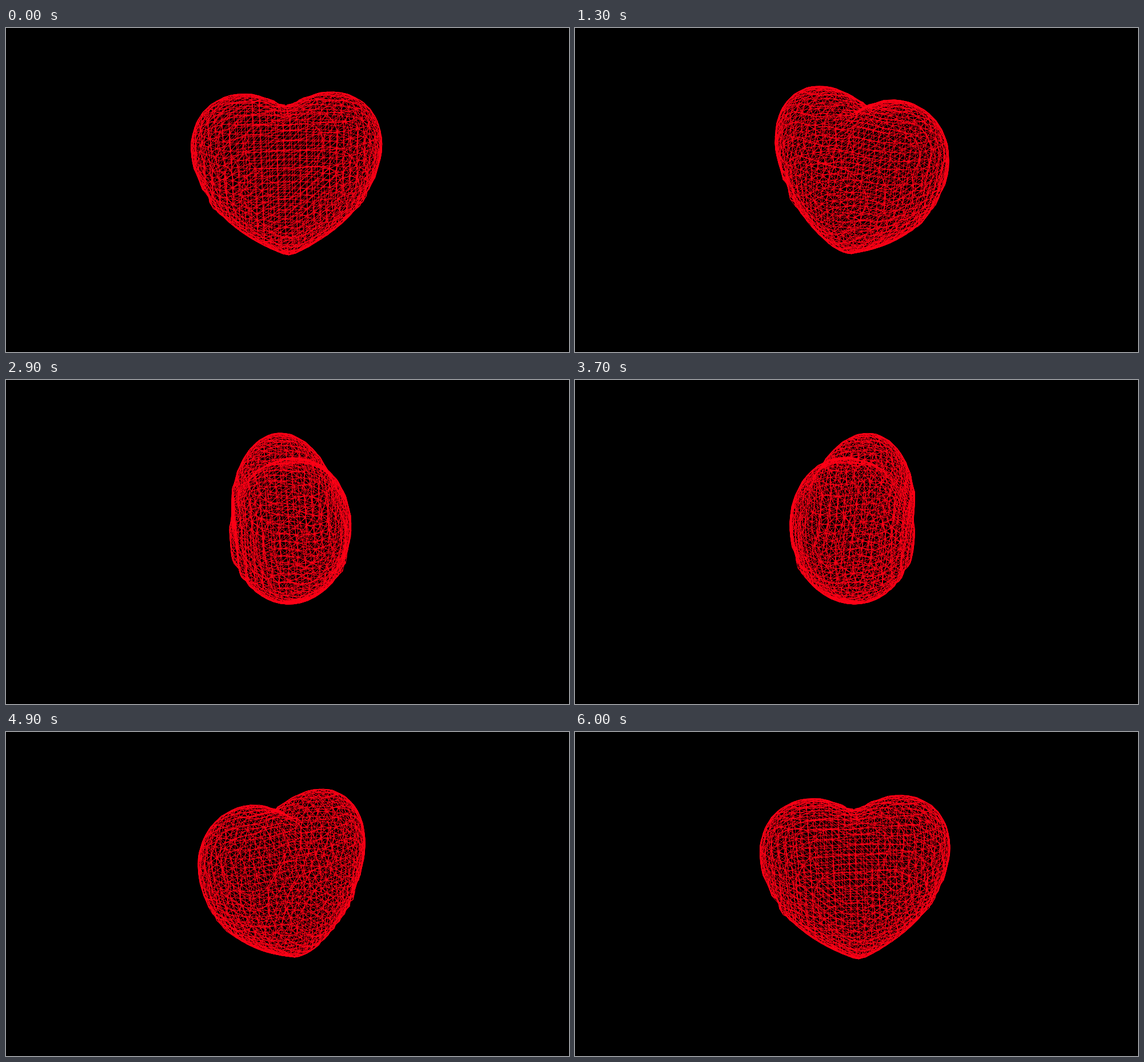
Write an HTML page with a canvas that moves like this. It is 985x568 px and loops after 6100 ms.

```html
<!DOCTYPE html>
<html>
<head>
<meta charset="utf-8">
<title>Rotating heart</title>
<style>
html, body { margin: 0; width: 100%; height: 100%; overflow: hidden; background: #000; }
canvas { display: block; }
</style>
</head>
<body>
<canvas id="stage" width="985" height="568"></canvas>
<script>
const W = 985, H = 568, LOOP = 6100, TICK = 100;
const ctx = document.getElementById('stage').getContext('2d');

const CELL = 0.08;               // grid spacing in heart units
const R = 17;                    // grid reaches from -R to R cells
const SIDE = 2 * R + 1;
const START_ANGLE = -4.7 * Math.PI / 180;
const TILT = Math.PI / 6;
const DISTANCE = 5;
const FOCAL = H / 2 / Math.tan(Math.PI / 8);

const heart = (x, y, z) =>
  (x * x + 2 * y * y + z * z - 1) ** 3 - (x * x + 0.1 * y * y) * z ** 3;

const nodeId = (i, j, k) => ((k + R) * SIDE + j + R) * SIDE + i + R;

function buildMesh() {
  const nodes = [];
  for (let k = -R; k <= R; k++)
    for (let j = -R; j <= R; j++)
      for (let i = -R; i <= R; i++) {
        const p = [i * CELL, j * CELL, k * CELL];
        nodes.push({ p, value: heart(...p) });
      }

  const vertices = [], vertexIds = new Map();
  const edges = [], known = new Set();
  const inside = id => nodes[id].value < 0;

  function crossing(a, b) {
    const lo = Math.min(a, b), hi = Math.max(a, b);
    const key = lo * nodes.length + hi;
    if (!vertexIds.has(key)) {
      const m = nodes[lo], n = nodes[hi];
      const f = m.value / (m.value - n.value);
      vertexIds.set(key, vertices.length);
      vertices.push(m.p.map((v, d) => v + f * (n.p[d] - v)));
    }
    return vertexIds.get(key);
  }

  function addEdge(a, b) {
    const key = Math.min(a, b) * 1e5 + Math.max(a, b);
    if (known.has(key)) return;
    known.add(key);
    edges.push([a, b]);
  }

  // Crossings are joined on each cell face; the joins close into polygons.
  function polygonize(corners) {
    const links = new Map();
    const join = (a, b) => {
      for (const [from, to] of [[a, b], [b, a]]) {
        if (!links.has(from)) links.set(from, []);
        links.get(from).push(to);
      }
    };
    for (let d = 0; d < 3; d++) {
      const u = 1 << (d + 1) % 3, v = 1 << (d + 2) % 3;
      for (const base of [0, 1 << d]) {
        const face = [base, base | u, base | u | v, base | v].map(c => corners[c]);
        const cuts = [];
        face.forEach((a, n) => {
          const b = face[(n + 1) % 4];
          if (inside(a) !== inside(b)) cuts.push(crossing(a, b));
        });
        if (cuts.length === 4 && inside(face[0])) cuts.unshift(cuts.pop());
        for (let n = 0; n < cuts.length; n += 2) join(cuts[n], cuts[n + 1]);
      }
    }
    const seen = new Set();
    for (const first of links.keys()) {
      if (seen.has(first)) continue;
      const loop = [];
      for (let at = first; at !== undefined; at = links.get(at).find(v => !seen.has(v))) {
        seen.add(at);
        loop.push(at);
      }
      loop.forEach((v, n) => {
        addEdge(v, loop[(n + 1) % loop.length]);
        if (n > 1 && n < loop.length - 1) addEdge(first, v);
      });
    }
  }

  for (let k = -R; k < R; k++)
    for (let j = -R; j < R; j++)
      for (let i = -R; i < R; i++) {
        const corners = [];
        for (let c = 0; c < 8; c++)
          corners.push(nodeId(i + (c & 1), j + (c >> 1 & 1), k + (c >> 2)));
        const count = corners.filter(inside).length;
        if (count > 0 && count < 8) polygonize(corners);
      }
  return { vertices, edges };
}

const mesh = buildMesh();
const cosTilt = Math.cos(TILT), sinTilt = Math.sin(TILT);

function project([x, y, z], cos, sin) {
  const side = x * cos - y * sin, near = x * sin + y * cos;
  const scale = FOCAL / (DISTANCE - z * sinTilt - near * cosTilt);
  return [W / 2 + side * scale, H / 2 - (z * cosTilt - near * sinTilt) * scale];
}

function draw(time) {
  const step = Math.floor(time % LOOP / TICK);
  const angle = START_ANGLE + Math.PI * step * TICK / LOOP;
  const cos = Math.cos(angle), sin = Math.sin(angle);
  const points = mesh.vertices.map(v => project(v, cos, sin));

  ctx.fillStyle = '#000';
  ctx.fillRect(0, 0, W, H);
  ctx.strokeStyle = '#ff0016';
  ctx.lineWidth = 1;
  const BATCH = 60;
  for (let n = 0; n < mesh.edges.length; n += BATCH) {
    ctx.beginPath();
    for (const [a, b] of mesh.edges.slice(n, n + BATCH)) {
      ctx.moveTo(...points[a]);
      ctx.lineTo(...points[b]);
    }
    ctx.stroke();
  }
}

const start = performance.now();
let shown = -1;
function tick() {
  const time = performance.now() - start;
  const step = Math.floor(time / TICK);
  if (step !== shown) {
    shown = step;
    draw(time);
  }
  requestAnimationFrame(tick);
}
tick();
</script>
</body>
</html>
```
